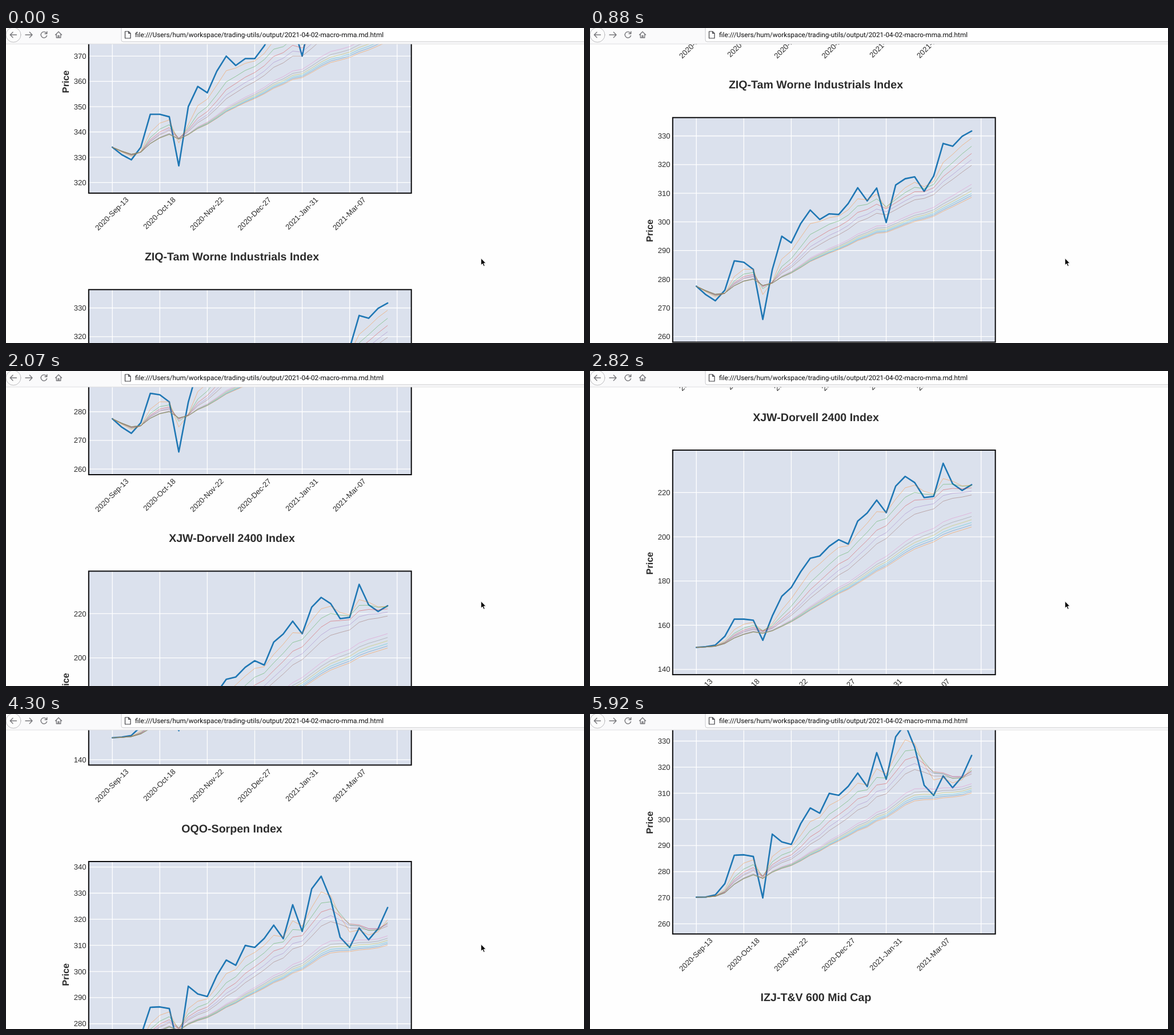
Write an HTML page that moves like this. It is 1012 by 553 pixels and loops after 6210 ms.

```html
<!DOCTYPE html>
<html lang="en">
<head>
<meta charset="utf-8">
<title>Moving averages</title>
<style>
  html, body { margin: 0; width: 100%; height: 100%; overflow: hidden; background: #fefefe; }
  svg { display: block; width: 1012px; height: 553px; }
  text { font-family: "Liberation Sans", Arial, sans-serif; fill: #2c2c2c; text-rendering: geometricPrecision; }
  .title { font-weight: bold; font-size: 19.6px; text-anchor: middle; }
  .axis { font-weight: bold; font-size: 16.3px; text-anchor: middle; }
  .tick { font-size: 13.1px; text-anchor: end; }
  .date { font-size: 13.2px; text-anchor: middle; }
  .url { font-family: Roboto, sans-serif; font-size: 11.8px; fill: #0c0c0d; }
  .grid { stroke: #fff; stroke-width: 1.3; }
  .line { fill: none; stroke-linejoin: round; }
  .price { stroke: #1f77b4; stroke-width: 2.6; stroke-linecap: round; }
  .mean { stroke-width: 0.9; stroke-opacity: 0.48; }
  .frame { fill: none; stroke: #0a0a0c; stroke-width: 2; }
  .icon { fill: none; stroke: #76767a; stroke-width: 1.4; stroke-linecap: round; stroke-linejoin: round; }
</style>
</head>
<body>
<svg id="stage" viewBox="0 0 1012 553">
  <rect width="1012" height="553" fill="#fefefe"/>
  <g id="page"></g>
  <rect width="1012" height="28" fill="#fafafb"/>
  <path d="M0 28H1012" stroke="#dedee0"/>
  <rect x="202" y="-6" width="830" height="30" rx="3" fill="#fff" stroke="#c9c9cc"/>
  <g class="icon">
    <circle cx="13" cy="12" r="13" fill="#fcfcfc" stroke="#bdbdc0" stroke-width="1"/>
    <path d="M18.500 12H7.500M12 7.300L7.300 12L12 16.700"/>
    <path d="M34 12H46M41.300 7.300L46 12L41.300 16.700"/>
    <path d="M70.500 8.500A5.300 5.300 0 1 0 71.500 13.500M71.800 6.200V10H68"/>
    <path d="M86.500 12L92 6.500L97.500 12M88.300 11.500V17H95.700V11.500M91 17V13.500H93V17"/>
    <path d="M208.500 6H214.500L218 9.500V18H208.500ZM214.500 6V9.500H218" stroke="#3c3c40" stroke-width="1.200"/>
  </g>
  <text class="url" x="226" y="16">file:///Users/hum/workspace/trading-utils/output/2021-04-02-macro-mma.md.html</text>
  <path id="cursor" d="M0 0V12L2.700 9.500L4.700 14L6.700 13.100L4.800 8.700H8.600Z" fill="#000" stroke="#fff" stroke-width="0.900"/>
</svg>
<script>
const LOOP = 6210, FRAME = 148, LAST = 40;
const LEFT = 144.8, WIDTH = 564.9, HEIGHT = 394.2, PITCH = 563.6, FIRST = -104.3;
const X0 = 186.2, WEEK = 16.62;
const DATES = ["2020-Sep-13", "2020-Oct-18", "2020-Nov-22", "2020-Dec-27", "2021-Jan-31", "2021-Mar-07"];
const COLORS = ["#ff7f0e", "#2ca02c", "#d62728", "#9467bd", "#8c564b", "#e377c2", "#7f7f7f", "#bcbd22", "#17becf", "#1f77b4"];
const range = (lo, hi, gap) => Array.from({ length: Math.floor((hi - lo) / gap) + 1 }, (_, i) => lo + i * gap);
const SPANS = [...range(3, 11, 2), ...range(21, 36, 3)];

// Weekly closes of the broad market; the other indexes are a drifting share of it
const MARKET = [334, 331, 329, 334, 347, 347, 346, 326.6, 350, 358, 355.5, 364, 370, 366.3, 369,
  369, 374, 381, 375.7, 383, 370, 388, 392.6, 390, 380.4, 383.6, 394, 389.5, 396, 400.6];

// top: value at the upper edge, scale: pixels per unit, share: [week, part of the market]
const charts = [
  { title: "", top: 404.6, scale: 4.44, gap: 10, share: [[0, 1]] },
  { title: "ZIQ-Tam Worne Industrials Index", top: 336.4, scale: 5.03, gap: 10,
    share: [[0, 0.831], [5, 0.824], [8, 0.8095], [9, 0.824], [18, 0.818], [22, 0.8025], [27, 0.838], [29, 0.828]] },
  { title: "XJW-Dorvell 2400 Index", top: 239.2, scale: 3.881, gap: 20,
    share: [[0, 0.449], [4, 0.469], [8, 0.469], [10, 0.498], [15, 0.5385], [16, 0.526], [18, 0.561], [22, 0.579],
      [25, 0.569], [26, 0.592], [28, 0.558]] },
  { title: "OQO-Sorpen Index", top: 342.1, scale: 4.585, gap: 10,
    share: [[0, 0.809], [2, 0.824], [7, 0.8265], [8, 0.841], [9, 0.814], [13, 0.8255], [14, 0.84], [18, 0.832],
      [19, 0.85], [22, 0.857], [25, 0.806], [28, 0.799], [29, 0.81]] },
  { title: "IZJ-T&V 600 Mid Cap" }
];

// Page offset at a few steps, steady in between
const SCROLL = [[0, 0], [6, 302], [14, 671.5], [19, 884], [25, 1166], [33, 1489], [37, 1594.5]];

const page = document.getElementById("page");
const cursor = document.getElementById("cursor");

function at(keys, t) {
  const i = keys.findIndex(key => key[0] >= t);
  if (i < 0) return keys[keys.length - 1][1];
  if (i === 0) return keys[0][1];
  const [t0, a] = keys[i - 1], [t1, b] = keys[i];
  return a + (b - a) * (t - t0) / (t1 - t0);
}

function add(parent, tag, attrs, text) {
  const el = document.createElementNS("http://www.w3.org/2000/svg", tag);
  for (const k in attrs) el.setAttribute(k, attrs[k]);
  if (text) el.textContent = text;
  return parent.appendChild(el);
}

// Exponentially weighted mean, normalised by the sum of weights
function ewm(values, span) {
  const r = 1 - 2 / (span + 1);
  let sum = 0, weight = 0;
  return values.map(v => (sum = sum * r + v) / (weight = weight * r + 1));
}

function drawChart({ title, top, scale, gap, share }, i) {
  const g = add(page, "g", { transform: `translate(0 ${FIRST + i * PITCH})` });
  add(g, "text", { class: "title", x: 395.5, y: -51.3 }, title);
  if (!share) return;

  const box = { x: LEFT, y: 0, width: WIDTH, height: HEIGHT };
  const yOf = v => (top - v) * scale;
  const line = (values, cls, stroke = "") => add(g, "polyline", {
    class: `line ${cls}`, stroke,
    points: values.map((v, n) => `${(X0 + n * WEEK).toFixed(2)},${yOf(v).toFixed(2)}`).join(" ")
  });

  add(g, "rect", { ...box, fill: "#dbe1ed" });
  for (let n = 0; n < 7; n++) {
    const x = X0 + n * 5 * WEEK;
    add(g, "path", { class: "grid", d: `M${x} 0V${HEIGHT}` });
    if (!DATES[n]) continue;
    const label = add(g, "text", { class: "date", dy: "0.36em" }, DATES[n]);
    const y = HEIGHT + 9 + label.getComputedTextLength() * Math.SQRT1_2 / 2;
    label.setAttribute("transform", `translate(${x - 1} ${y}) rotate(-45)`);
  }
  const lowest = Math.ceil((top - HEIGHT / scale) / gap) * gap;
  for (const v of range(lowest, top, gap)) {
    // no label fits right under the upper edge
    add(g, "path", { class: "grid", d: `M${LEFT} ${yOf(v)}h${WIDTH}` });
    add(g, "text", { class: "tick", x: 140.5, y: yOf(v) + 4.6 }, String(v));
  }
  const price = MARKET.map((v, n) => v * at(share, n));
  line(price, "price");
  SPANS.forEach((s, n) => line(ewm(price, s), "mean", COLORS[n % COLORS.length]));
  add(g, "rect", { ...box, class: "frame" });
  add(g, "text", { class: "axis", transform: "translate(110 198.600) rotate(-90)" }, "Price");
}

function draw(ms) {
  const k = Math.min(LAST, Math.floor((ms + 9) / FRAME));
  page.setAttribute("transform", `translate(0 ${-at(SCROLL, k)})`);
  // at the end the pointer leaves through the lower right
  const u = Math.max(0, (k - 36) / 4);
  cursor.setAttribute("transform", `translate(${831.7 + 176 * u} ${404.3 + 170 * u ** 1.5})`);
}

charts.forEach(drawChart);
const begin = performance.now();
function tick() {
  draw((performance.now() - begin) % LOOP);
  requestAnimationFrame(tick);
}
tick();
</script>
</body>
</html>
```
